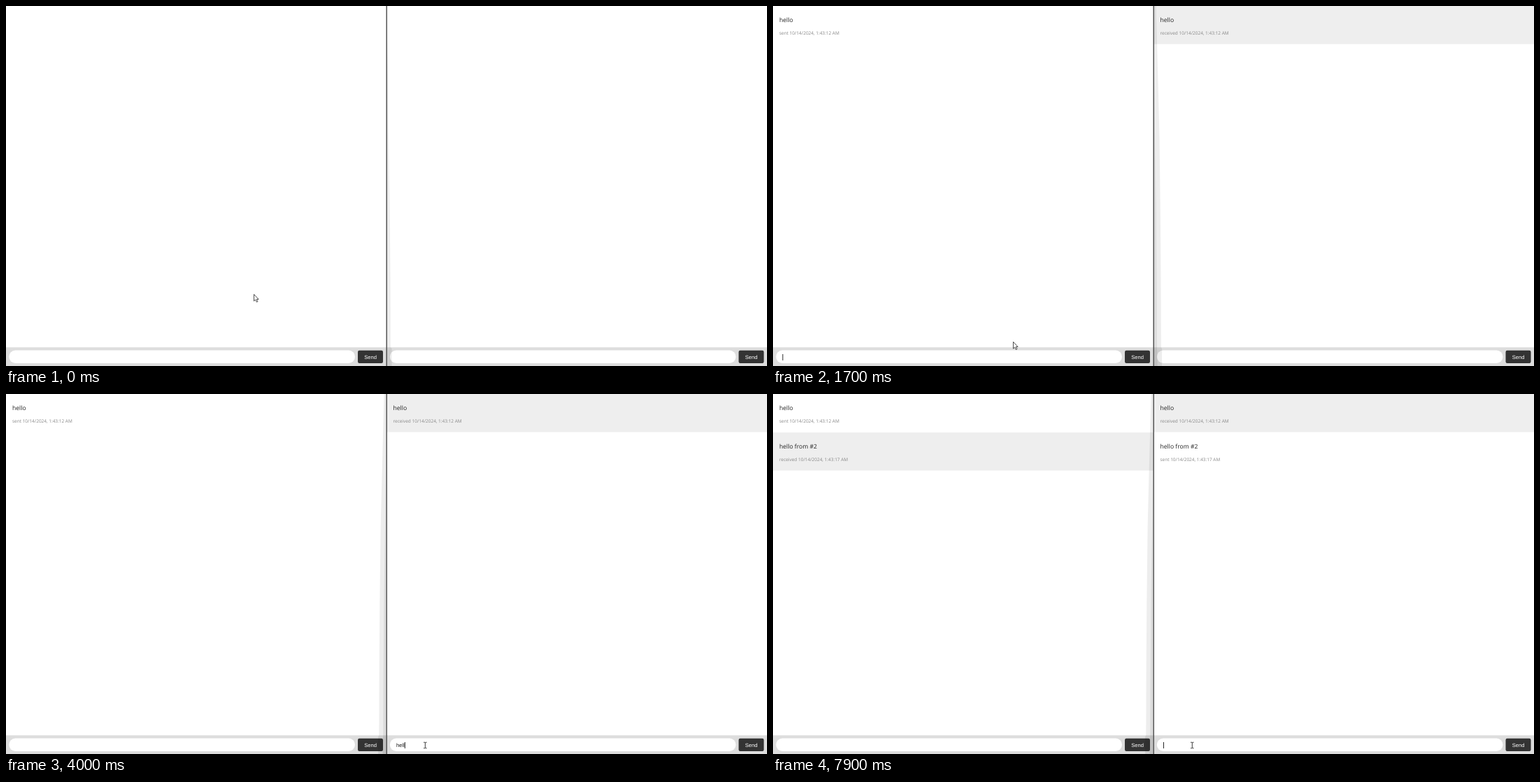
These frames come from a looping animation (1088 px wide and 515 px high, 8000 ms). An HTML page:

```html
<!DOCTYPE html>
<html lang="en">
<head>
<meta charset="utf-8">
<title>Two chat windows</title>
<style>
  html, body { margin: 0; width: 100%; height: 100%; overflow: hidden; background: #fff; }
  svg { display: block; width: 1088px; height: 515px; }
  text { white-space: pre; text-rendering: geometricPrecision; }
  .body { font: 8.6px "Open Sans", "Noto Sans", sans-serif; fill: #222; }
  .date { font: 6.47px "Open Sans", "Noto Sans", sans-serif; fill: #888; }
  .field, .send { font: 7.6px "Liberation Sans", Arial, sans-serif; fill: #111; }
  .send { fill: #fff; text-anchor: middle; }
  .shadow { fill: #000; }
</style>
</head>
<body>
<svg id="stage" viewBox="0 0 1088 515"></svg>
<script>
const LOOP = 8000, STEP = 100, PANE = 544.5;
const stage = document.getElementById('stage');

// [time, typed text, caret visible]
const typing = [
  [[0, '', 0], [200, '', 1], [700, '', 0], [900, 'he', 1], [1100, 'hel', 1],
   [1300, 'hell', 1], [1400, 'hello', 1], [1700, '', 1], [2000, '', 0],
   [2500, '', 1], [3000, '', 0]],
  [[0, '', 0], [3000, '', 1], [3500, '', 0], [3700, 'he', 1], [3800, 'hel', 1],
   [4000, 'hell', 1], [4100, 'hello', 1], [4200, 'hello ', 1], [4600, 'hello f', 1],
   [4800, 'hello fr', 1], [4900, 'hello from', 1], [5000, 'hello from ', 1],
   [5600, 'hello from #', 1], [5800, 'hello from #2', 1], [6000, '', 1],
   [6400, '', 0], [6900, '', 1], [7400, '', 0], [7900, '', 1]]
];

// [time, x, y, shape]
const pointer = [
  [0, 354.5, 412.5, 'arrow'], [100, 354, 462, 'arrow'], [200, 353, 504, 'beam'],
  [400, 352, 499, 'beam'], [500, 348, 484, 'arrow'], [600, 345, 477, 'arrow'],
  [700, 343.5, 480.5, 'arrow'], [2300, 347, 479, 'arrow'], [2400, 375, 476, 'arrow'],
  [2500, 430, 474, 'arrow'], [2600, 490, 477, 'arrow'], [2700, 545, 484, 'arrow'],
  [2800, 585, 499, 'beam'], [2900, 599.7, 509.5, 'beam'], [3200, 599.3, 502.5, 'beam']
];

// [time, shadow shape]
const focus = [[0, 'rising'], [100, 'right'], [3000, 'left']];

const messages = [
  { at: 1700, from: 0, text: 'hello', date: '10/14/2024, 1:43:12 AM' },
  { at: 6000, from: 1, text: 'hello from #2', date: '10/14/2024, 1:43:17 AM' }
];

function messageMarkup(message, row, side) {
  const received = message.from !== side;
  const fill = received ? '#eee' : 'none';
  return `<g data-at="${message.at}" transform="translate(0 ${row * 55})">
    <rect width="${side ? 543.5 : 544}" height="54.5" fill="${fill}"/>
    <text class="body" x="9" y="23">${message.text}</text>
    <text class="date" x="9" y="41.4">${received ? 'received' : 'sent'} ${message.date}</text>
  </g>`;
}

function paneMarkup(side) {
  return `<g transform="translate(${side * PANE} 0)">
    ${messages.map((message, row) => messageMarkup(message, row, side)).join('')}
    <rect y="488.3" width="544.5" height="27" fill="#ddd"/>
    <rect x="4.3" y="492.5" width="494.7" height="18.5" rx="9.2" fill="#fff"/>
    <rect x="503" y="492.7" width="36" height="18.3" rx="2.2" fill="#333"/>
    <text class="send" x="521" y="504.8">Send</text>
    <text class="field" id="field${side}" x="13.5" y="504.8"></text>
    <rect id="caret${side}" y="498" width="0.9" height="9" fill="#111"/>
  </g>`;
}

const fullShadow = `
  <path class="shadow" opacity=".07" d="M0 0H3L4.5 55 6.5 130 8 190 9.3 300 10 400 10.3 488 11.5 490V515H0Z"/>
  <path class="shadow" opacity=".07" d="M0 60L1.5 180 3 280 4 400 4.4 488 5 515H0Z"/>`;

stage.innerHTML = `
  ${paneMarkup(0)}${paneMarkup(1)}
  <g id="rising" transform="translate(544.6 0)">
    <path class="shadow" opacity=".07" d="M0 20L1.2 90 2.6 200 4.2 300 5 400 5.2 488 7 490V515H0Z"/>
  </g>
  <g id="right" transform="translate(544.6 0)">${fullShadow}</g>
  <g id="left" transform="translate(543.6 0) scale(-1 1)">${fullShadow}</g>
  <rect x="543.5" width="1.4" height="515" fill="#484848"/>
  <g id="arrow">
    <path d="M0 0V9.6L2.2 7.6 3.8 11 5.4 10.3 3.9 7H6.6Z" fill="#fff" stroke="#222" stroke-width=".8"/>
  </g>
  <g id="beam">
    <path d="M-2.2-4.2H-.6L0-3.7.6-4.2H2.2M0-3.7V3.7M-2.2 4.2H-.6L0 3.7.6 4.2H2.2" fill="none" stroke="#222" stroke-width=".9"/>
  </g>`;

const byId = id => document.getElementById(id);
const show = (node, on) => node.setAttribute('visibility', on ? 'visible' : 'hidden');
const current = (steps, t) => steps.filter(step => step[0] <= t).pop();
const rows = [...stage.querySelectorAll('[data-at]')];

function render(t) {
  typing.forEach((steps, side) => {
    const [, text, caretOn] = current(steps, t);
    const field = byId('field' + side), caret = byId('caret' + side);
    field.textContent = text;
    caret.setAttribute('x', 13.5 + (text ? field.getComputedTextLength() : 0));
    show(caret, caretOn);
  });

  rows.forEach(row => show(row, t >= +row.dataset.at));

  const [, shadow] = current(focus, t);
  ['rising', 'right', 'left'].forEach(id => show(byId(id), id === shadow));

  const [, x, y, shape] = current(pointer, t);
  ['arrow', 'beam'].forEach(id => show(byId(id), id === shape));
  byId(shape).setAttribute('transform', `translate(${x} ${y})`);
}

const start = performance.now();
let last = -1;
function tick() {
  const elapsed = (performance.now() - start) % LOOP;
  const t = Math.floor(elapsed / STEP) * STEP;
  if (t !== last) render(last = t);
  requestAnimationFrame(tick);
}
tick();
</script>
</body>
</html>
```
